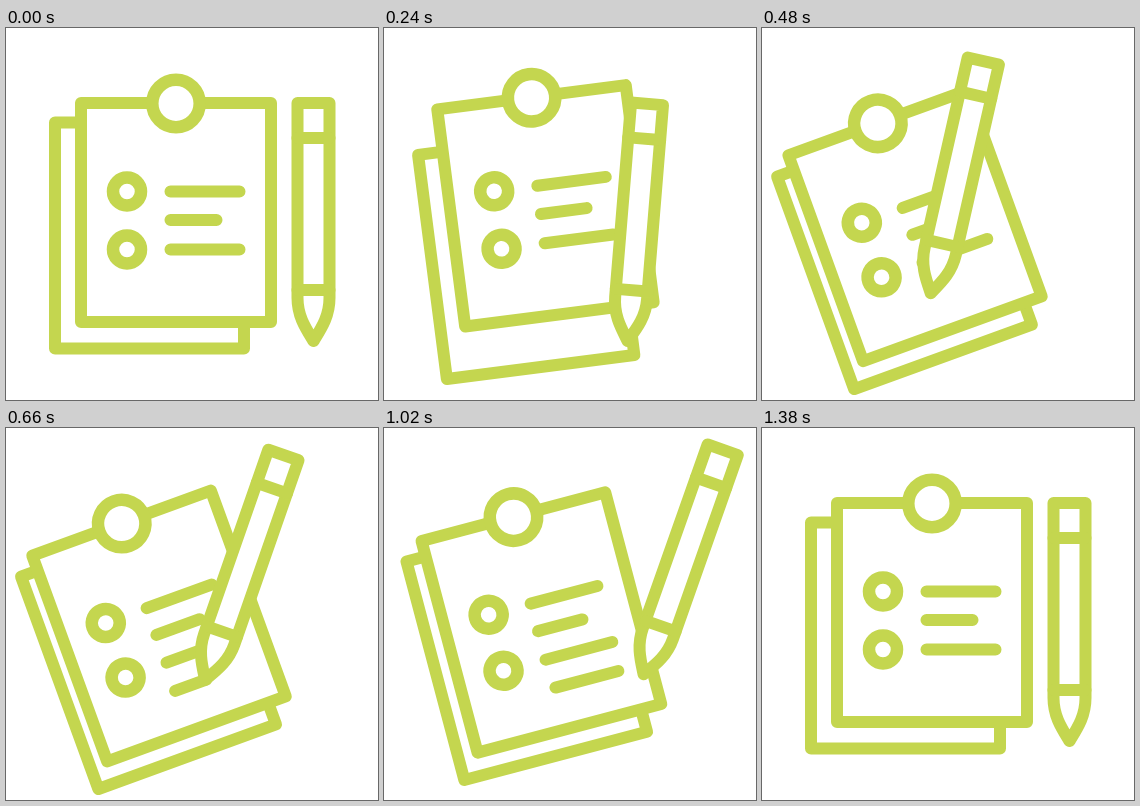
An HTML page that plays this animation: 372 px wide and 372 px high, repeating every 1.5 s.

```html
<!DOCTYPE html>
<html lang="en">
<head>
<meta charset="utf-8">
<title>Clipboard and pencil</title>
<style>
  html, body { margin: 0; width: 100%; height: 100%; overflow: hidden; background: #fff; }
  svg { display: block; width: 100%; height: 100%; }
  .ink { fill: #fff; stroke: #c4d64f; stroke-width: 12; stroke-linecap: round; stroke-linejoin: round; }
</style>
</head>
<body>
<svg viewBox="0 0 372 372">
  <g class="ink">
    <!-- sheets are drawn around their own centre, the pencil around its tip -->
    <rect id="back" x="-94.5" y="-113" width="189" height="226"/>
    <g id="front">
      <rect x="-95" y="-109.5" width="190" height="219"/>
      <g stroke-width="12.5">
        <circle cy="-109" r="23.7"/>
        <circle cx="-49" cy="-21" r="14"/>
        <circle cx="-49" cy="37" r="14"/>
      </g>
      <path d="M-5.5-21H63.5M-5.5 7.5H40.5M-5.5 37H63.5"/>
      <path id="note"/>
    </g>
    <g id="pencil">
      <path d="M-16-238H16V-43C16-25 8-13 0 0C-8-13-16-25-16-43Z"/>
      <path d="M-16-203H16M-16-51H16"/>
    </g>
  </g>
</svg>
<script>
  const LOOP = 1500, STEP = 30;
  const TILT = 20, LEAN_IN = 12.8, LEAN_OUT = 26.2;
  const REST = [307.5, 313], NOTE_START = [168.5, 263], NOTE_END = [232.5, 239.5];
  const NOTE_LEFT = -7, NOTE_RIGHT = 62;

  const [back, front, note, pencil] =
    ['back', 'front', 'note', 'pencil'].map(id => document.getElementById(id));

  const span = (t, a, b) => Math.min(1, Math.max(0, (t - a) / (b - a)));
  const ease = u => (1 - Math.cos(Math.PI * u)) / 2;
  const arc = u => Math.sin(Math.PI * u);
  const hump = u => arc(u) ** 2;
  const mix = (a, b, k) => a + (b - a) * k;
  const mixPoint = (a, b, k) => a.map((v, i) => mix(v, b[i], k));

  function place(el, x, y, angle) {
    el.setAttribute('transform', `translate(${x.toFixed(2)} ${y.toFixed(2)}) rotate(${angle.toFixed(2)})`);
  }

  function draw(t) {
    const come = span(t, 60, 495);
    const write = span(t, 495, 840);
    const leave = span(t, 840, 1370);
    const erase = span(t, 1000, 1350);

    // sheets tilt together and part briefly on the way
    const tilt = ease(come) - ease(leave);
    const part = hump(come);
    place(back, 143.5 - tilt - part, 207.5 + 15 * tilt + 15 * part, -TILT * tilt);
    place(front, 170 - 17 * tilt - 2.5 * part, 184.5 + 13.5 * tilt - 12.5 * part, -TILT * tilt);

    // the note is written and wiped from left to right
    const from = mix(NOTE_LEFT, NOTE_RIGHT, erase), to = mix(NOTE_LEFT, NOTE_RIGHT, write);
    note.setAttribute('d', to > from ? `M${from} 66.5H${to}` : '');

    let tip, lean;
    if (leave > 0) {
      const k = ease(leave), h = hump(leave);
      tip = mixPoint(NOTE_END, REST, k);
      tip[0] += 10 * h;
      tip[1] -= 16 * h;
      lean = mix(LEAN_OUT, 0, k);
    } else if (write > 0) {
      tip = mixPoint(NOTE_START, NOTE_END, write);
      lean = mix(LEAN_IN, LEAN_OUT, write);
    } else {
      const k = ease(come);
      tip = mixPoint(REST, NOTE_START, k);
      tip[0] -= 14 * part;
      tip[1] += 19 * arc(come);
      lean = mix(0, LEAN_IN, k);
    }
    place(pencil, ...tip, lean);
  }

  function tick() {
    const t = performance.now() % LOOP;
    draw(Math.floor(t / STEP) * STEP);
    requestAnimationFrame(tick);
  }
  tick();
</script>
</body>
</html>
```
